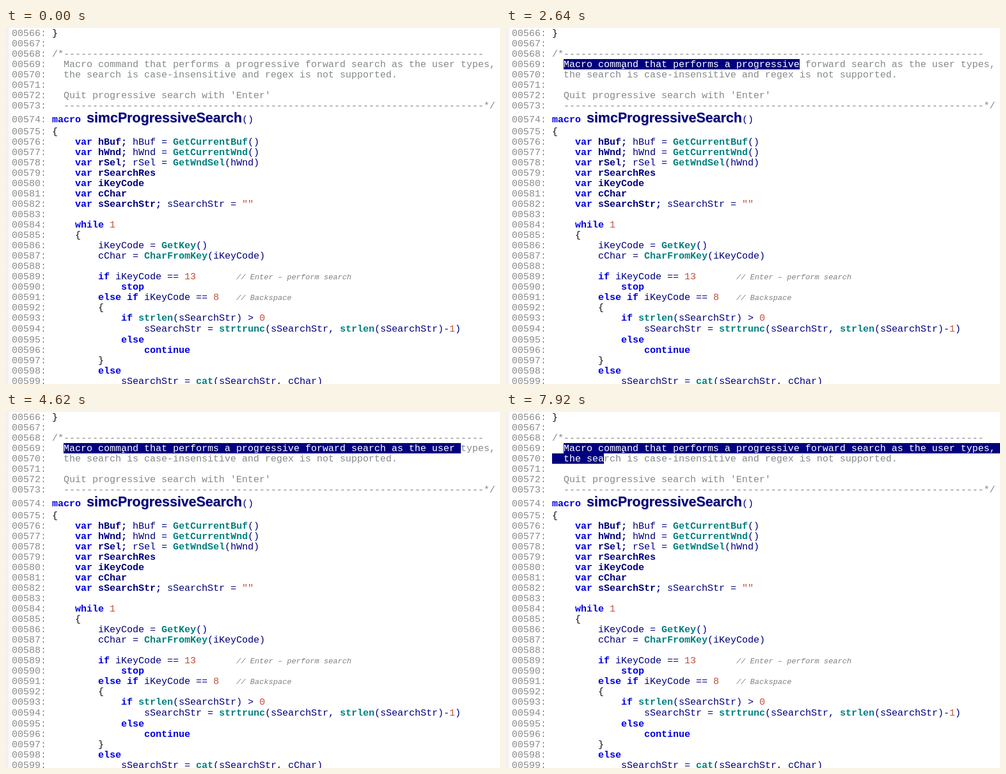
Recreate the animation shown at these times as an HTML page with a canvas. Size 858 by 619 pixels, loop 8 s.

```html
<!DOCTYPE html>
<html lang="en">
<head>
<meta charset="utf-8">
<style>
  html, body { margin: 0; width: 858px; height: 619px; overflow: hidden; background: #fff; }
  canvas { display: block; }
</style>
</head>
<body>
<canvas id="stage" width="858" height="619"></canvas>
<script>
const ctx = document.getElementById('stage').getContext('2d', { alpha: false });
const CELL = 10, LEFT = 80, LOOP = 8000;
const NAVY = '#000080', BLUE = '#0000e6', TEAL = '#008080', RED = '#c0503c', GRAY = '#848a8a';
const RULE = '-'.repeat(73);
const MONO = '16.667px "Liberation Mono", monospace';
const SMALL = 'italic 13.333px "Liberation Mono", monospace';
const TITLE = 'bold 23.8px "Liberation Sans", Arial, sans-serif';

const lines = `}

/*${RULE}
  Macro command that performs a progressive forward search as the user types,
  the search is case-insensitive and regex is not supported.

  Quit progressive search with 'Enter'
  ${RULE}*/
macro simcProgressiveSearch()
{
    var hBuf; hBuf = GetCurrentBuf()
    var hWnd; hWnd = GetCurrentWnd()
    var rSel; rSel = GetWndSel(hWnd)
    var rSearchRes
    var iKeyCode
    var cChar
    var sSearchStr; sSearchStr = ""

    while 1
    {
        iKeyCode = GetKey()
        cChar = CharFromKey(iKeyCode)

        if iKeyCode == 13       // Enter – perform search
            stop
        else if iKeyCode == 8   // Backspace
        {
            if strlen(sSearchStr) > 0
                sSearchStr = strtrunc(sSearchStr, strlen(sSearchStr)-1)
            else
                continue
        }
        else
            sSearchStr = cat(sSearchStr, cChar)`.split('\n');

const TITLE_ROW = 8, COMMENT_FIRST = 2, COMMENT_LAST = 7;

// Each rule: pattern, colour, font
const rules = [
  [/\/\/.*/y, '#808080', SMALL],
  [/(?<=var )\w+;?/y, NAVY, 'bold ' + MONO],
  [/\b(macro|var|while|if|else|stop|continue)\b/y, BLUE, 'bold ' + MONO],
  [/\b[a-zA-Z]+(?=\()/y, TEAL, 'bold ' + MONO],
  [/\b\d+|"[^"]*"/y, RED, MONO],
  [/[{}]/y, '#101010', MONO],
  [/\w+|[^\w\s]/y, NAVY, MONO],
];

function baseline(row) {
  if (row === TITLE_ROW) return 164;
  return 14 + row * 18 + (row > TITLE_ROW ? 9 : 0) + (row > 27) + (row > 28);
}

function write(text, x, y, color, font = MONO) {
  ctx.font = font;
  ctx.fillStyle = color;
  ctx.fillText(text, x, y);
}

function drawCode(line, y) {
  for (let col = 0; col < line.length;) {
    let length = 1;
    for (const [pattern, color, font] of rules) {
      pattern.lastIndex = col;
      const match = pattern.exec(line);
      if (!match) continue;
      write(match[0], LEFT + col * CELL, y, color, font);
      length = match[0].length;
      break;
    }
    col += length;
  }
}

function drawTitle(y) {
  const name = 'simcProgressiveSearch';
  write('macro', LEFT, y, BLUE, 'bold ' + MONO);
  write(name, 141, y + 1, '#b8b8c8', TITLE);
  write(name, 140, y, NAVY, TITLE);
  write('()', 410, y, NAVY);
}

function drawPage() {
  const margin = ctx.createLinearGradient(0, 0, 10, 0);
  margin.addColorStop(0, '#ededed');
  margin.addColorStop(1, '#fff');
  ctx.fillStyle = '#fff';
  ctx.fillRect(0, 0, 858, 619);
  ctx.fillStyle = margin;
  ctx.fillRect(0, 0, 10, 619);
  lines.forEach((line, row) => {
    const y = baseline(row);
    write(`00${566 + row}:`, 10, y, '#8c8c8c');
    if (row === TITLE_ROW) drawTitle(y);
    else if (row >= COMMENT_FIRST && row <= COMMENT_LAST) write(line, LEFT, y, GRAY);
    else drawCode(line, y);
  });
}

function select(row, from, to) {
  const top = row * 18;
  ctx.save();
  ctx.beginPath();
  ctx.rect(from, top, to - from, 18);
  ctx.clip();
  ctx.fillStyle = NAVY;
  ctx.fillRect(from, top, to - from, 18);
  write(lines[row], LEFT, baseline(row), '#fff');
  if (row === 3) {
    // Foot of the text pointer
    ctx.fillRect(203, 66, 1, 5);
    ctx.fillRect(201, 70, 2, 1);
    ctx.fillRect(204, 70, 2, 1);
  }
  ctx.restore();
}

// Right edge of the selection, one entry per key repeat
const STEP = 330;
const firstEdges = [100, 100, 110, 120, 210, 220, 300, 410, 510, 610, 690, 700, 710, 730, 790, 840, 850, 858];
const secondEdges = [[6270, 100], [7260, 110], [7590, 120], [7920, 170]];

function draw() {
  const t = performance.now() % LOOP;
  const step = Math.min(Math.floor(t / STEP), firstEdges.length - 1);
  drawPage();
  if (firstEdges[step] > 100) select(3, 100, firstEdges[step]);
  const second = secondEdges.filter(([start]) => t >= start).pop();
  if (second) select(4, LEFT, second[1]);
  requestAnimationFrame(draw);
}
draw();
</script>
</body>
</html>
```
